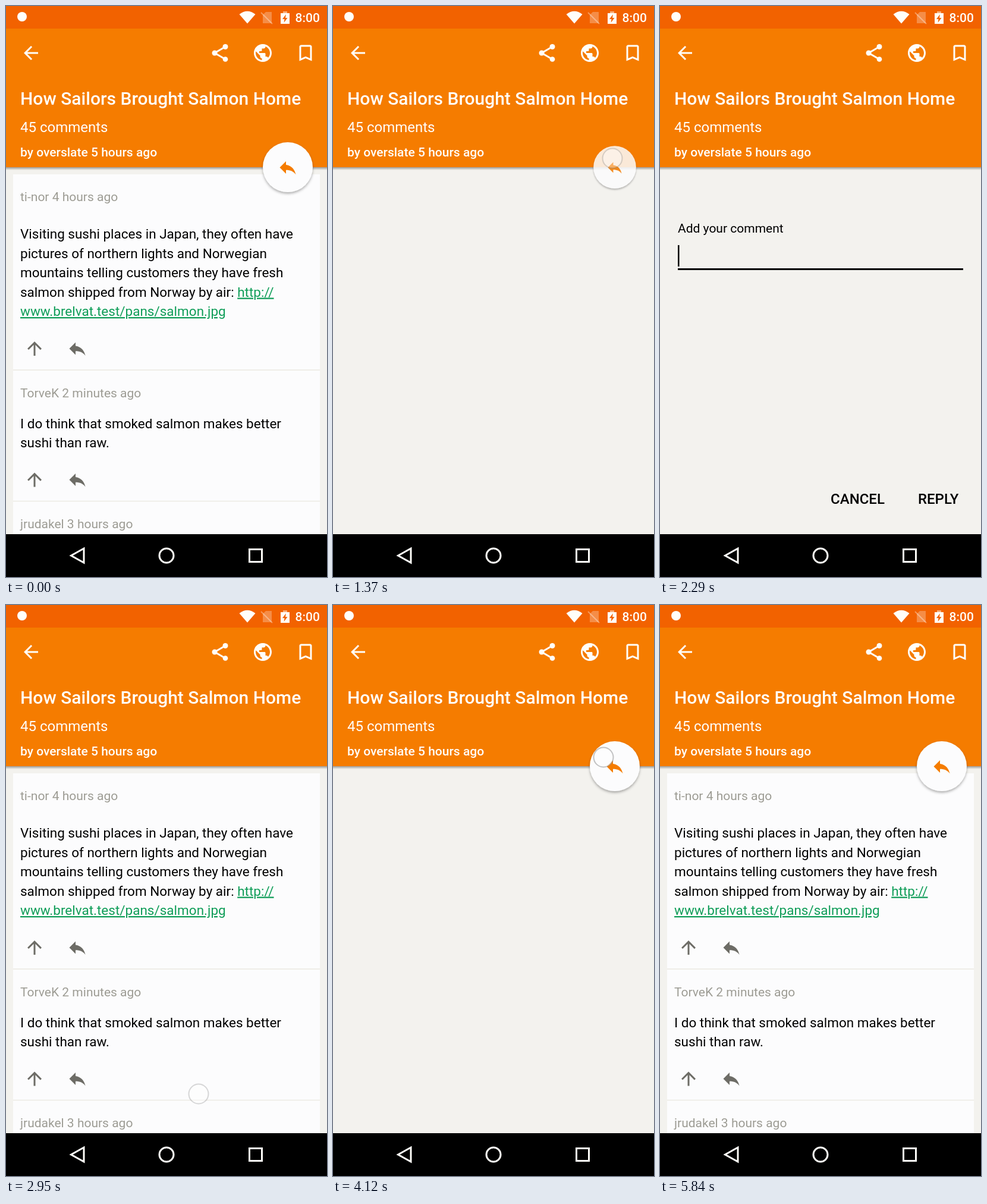
Animation of 540x960 px, one loop 5.89 s. Source, as an HTML page:

```html
<!DOCTYPE html>
<html lang="en">
<head>
<meta charset="utf-8">
<title>Comment reveal</title>
<style>
  html, body { margin: 0; width: 100%; height: 100%; overflow: hidden; background: #000; }
  svg { display: block; width: 540px; height: 960px; font-family: Roboto, "Noto Sans", sans-serif;
        --bar: #f57c00; --status: #f26200; --page: #f3f2ee; --link: #0f9d58; }
  text { white-space: pre; }
  .medium { font-weight: 500; }
  .light { fill: #fffefa; }
  .meta { font-size: 21px; fill: #9d9c94; }
  .body { font-size: 22.5px; fill: #000; }
  .link { fill: var(--link); text-decoration: underline; }
  .action { fill: #6d6c66; }
  .button { font-size: 24px; font-weight: 500; fill: #000; }
  .nav { fill: none; stroke: #fffefa; stroke-width: 3; }
</style>
</head>
<body>
<svg viewBox="0 0 540 960">
  <defs>
    <path id="back" d="M20 11H7.83l5.59-5.59L12 4l-8 8 8 8 1.41-1.41L7.83 13H20v-2z"/>
    <path id="up" d="M4 12l1.41 1.41L11 7.83V20h2V7.83l5.58 5.59L20 12l-8-8-8 8z"/>
    <path id="reply" d="M10 9V5l-7 7 7 7v-4.1c5 0 8.5 1.6 11 5.1-1-5-4-10-11-11z"/>
    <path id="save" d="M17 3H7c-1.1 0-1.99.9-1.99 2L5 21l7-3 7 3V5c0-1.1-.9-2-2-2zm0 15l-5-2.18L7 18V5h10v13z"/>
    <path id="globe" d="M12 2C6.48 2 2 6.48 2 12s4.48 10 10 10 10-4.48 10-10S17.52 2 12 2zm-1 17.93c-3.95-.49-7-3.85-7-7.93 0-.62.08-1.21.21-1.79L9 15v1c0 1.1.9 2 2 2v1.93zm6.9-2.54c-.26-.81-1-1.39-1.9-1.39h-1v-3c0-.55-.45-1-1-1H8v-2h2c.55 0 1-.45 1-1V7h2c1.1 0 2-.9 2-2v-.41c2.93 1.19 5 4.06 5 7.41 0 2.08-.8 3.97-2.1 5.39z"/>
    <g id="share">
      <path d="M18 5L6 12l12 7" fill="none" stroke="#fffefa" stroke-width="2"/>
      <circle cx="18" cy="5" r="3"/><circle cx="6" cy="12" r="3"/><circle cx="18" cy="19" r="2.9"/>
    </g>
    <g id="actions" class="action">
      <use href="#up" transform="translate(30 558) scale(1.5)"/>
      <use href="#reply" transform="translate(102 558) scale(1.5)"/>
    </g>
    <linearGradient id="shade" x2="0" y2="1">
      <stop offset="0" stop-color="#444" stop-opacity=".5"/>
      <stop offset="1" stop-color="#444" stop-opacity="0"/>
    </linearGradient>
    <filter id="lift" x="-20%" y="-20%" width="140%" height="140%">
      <feDropShadow dx="0" dy="2.5" stdDeviation="2" flood-color="#000" flood-opacity=".32"/>
    </filter>
    <clipPath id="reveal"><circle id="hole" cx="474" cy="271" r="778"/></clipPath>
  </defs>

  <rect width="540" height="960" fill="var(--page)"/>

  <g id="list">
    <rect x="12" y="283" width="516" height="605" fill="#fcfcfd"/>
    <path d="M12 612h516M12 832.5h516" stroke="#ebe9e2" stroke-width="1.5"/>
    <text class="meta" x="24" y="327.5">ti-nor 4 hours ago</text>
    <g class="body">
      <text x="24" y="391">Visiting sushi places in Japan, they often have</text>
      <text x="24" y="423.5">pictures of northern lights and Norwegian</text>
      <text x="24" y="456">mountains telling customers they have fresh</text>
      <text x="24" y="488.5">salmon shipped from Norway by air: <tspan class="link">http://</tspan></text>
      <text x="24" y="521" class="link">www.brelvat.test/pans/salmon.jpg</text>
      <text x="24" y="709.5">I do think that smoked salmon makes better</text>
      <text x="24" y="742">sushi than raw.</text>
    </g>
    <use href="#actions"/>
    <text class="meta" x="24" y="657.5">TorveK 2 minutes ago</text>
    <use href="#actions" y="220.5"/>
    <text class="meta" x="24" y="878">jrudakel 3 hours ago</text>
  </g>

  <g id="form" clip-path="url(#reveal)">
    <text id="label" x="30">Add your comment</text>
    <rect id="caret" x="30" y="402" width="2.5" height="36"/>
    <rect x="30" y="441" width="480" height="3"/>
    <text class="button" x="287" y="837">CANCEL</text>
    <text class="button" x="434" y="837">REPLY</text>
  </g>

  <rect y="271" width="540" height="5" fill="url(#shade)"/>
  <rect width="540" height="271" fill="var(--bar)"/>
  <rect width="540" height="38" fill="var(--status)"/>

  <g class="light">
    <circle cx="27" cy="18" r="8"/>
    <path d="M392.500 14Q406 3.500 419.500 14L406 29.500z"/>
    <path d="M462 12h15v18h-15z"/>
    <path d="M466 9h7v3h-7z" opacity=".5"/>
    <path d="M471 14l-6 8h3.500l-1 6 6-8h-3.500z" fill="var(--status)"/>
    <text class="medium" x="486.500" y="27" font-size="21">8:00</text>
  </g>
  <path d="M437 10h10v19h-15V15z" fill="#fff" opacity=".28"/>
  <path d="M429 11l19 19" stroke="#fff" stroke-width="2" opacity=".35"/>

  <g class="light">
    <use href="#back" transform="translate(24 61) scale(1.5)"/>
    <use href="#share" transform="translate(342 61) scale(1.5)"/>
    <use href="#globe" transform="translate(414 61) scale(1.5)"/>
    <use href="#save" transform="translate(486 61) scale(1.5)"/>
    <text class="medium" x="24" y="166" font-size="30">How Sailors Brought Salmon Home</text>
    <text x="24" y="211.500" font-size="24">45 comments</text>
    <text class="medium" x="24" y="253" font-size="21">by overslate 5 hours ago</text>
  </g>

  <g id="fab">
    <circle cx="474" cy="271" r="42" fill="#fcfcfd" filter="url(#lift)"/>
    <use href="#reply" transform="translate(456 253.500) scale(1.5)" fill="var(--bar)"/>
  </g>

  <circle id="touch" r="16.500" fill="#fff" fill-opacity=".6" stroke="#888" stroke-opacity=".5" stroke-width="2"/>

  <rect y="888" width="540" height="72"/>
  <g class="nav">
    <path d="M109.500 924L131 912v24z"/>
    <circle cx="270" cy="924" r="12"/>
    <rect x="409.500" y="913.500" width="21" height="21"/>
  </g>
</svg>

<script>
const LOOP = 5890, STEP = 50.9, LAST = 11;
const taps = [
  { at: 1220, opens: true,  x: 470, y: 256 },
  { at: 2790, opens: false, x: 324, y: 822 },
  { at: 4010, opens: true,  x: 455, y: 256 },
  { at: 5280, opens: false, x: 330, y: 813 },
];
const touchAlpha = [0, 1, 1, .65, .3];

const $ = id => document.getElementById(id);
const [list, form, label, caret, hole, fab, touch] =
  ["list", "form", "label", "caret", "hole", "fab", "touch"].map($);

const ramp = (v, from, to) => Math.min(1, Math.max(0, (v - from) / (to - from)));
const ease = u => .5 - Math.cos(u * Math.PI) / 2;
const show = (el, on) => el.setAttribute("visibility", on ? "visible" : "hidden");
const set = (el, attrs) => {
  for (const name in attrs) el.setAttribute(name, attrs[name]);
};

function draw(t) {
  const tap = taps.filter(p => p.at <= t).pop();
  const step = tap ? Math.min(LAST, Math.floor((t - tap.at + 8) / STEP)) : LAST;
  const opening = !!tap && tap.opens;

  // The list and the form swap at once; the form is then uncovered from the button.
  const formOn = opening ? step >= 2 : !!tap && step < 3;
  show(list, !formOn && !(opening && step >= 2));
  show(form, formOn);
  set(hole, { r: opening ? 42 + 736 * ease(ramp(step, 2, 10)) : 778 });

  const float = opening ? ease(ramp(step, 4.2, 8.2)) : 1;
  set(label, { y: 428 - 47 * float, "font-size": 21 + .8 * (1 - float) });

  const focus = t - (t < 4010 ? 1220 : 4010);
  show(caret, formOn && (focus < 560 || (focus >= 1070 && focus < 1560)));

  const size = opening ? 1 - ease(ramp(step, 2, 6)) : tap ? ease(ramp(step, 3, 10)) : 1;
  show(fab, size > 0);
  set(fab, { transform: `translate(474 271) scale(${size}) translate(-474 -271)`, opacity: size });

  const alpha = tap && touchAlpha[step] || 0;
  set(touch, { cx: tap ? tap.x : 0, cy: tap ? tap.y : 0, opacity: alpha });
}

const start = performance.now();
function tick() {
  draw((performance.now() - start) % LOOP);
  requestAnimationFrame(tick);
}
tick();
</script>
</body>
</html>
```
